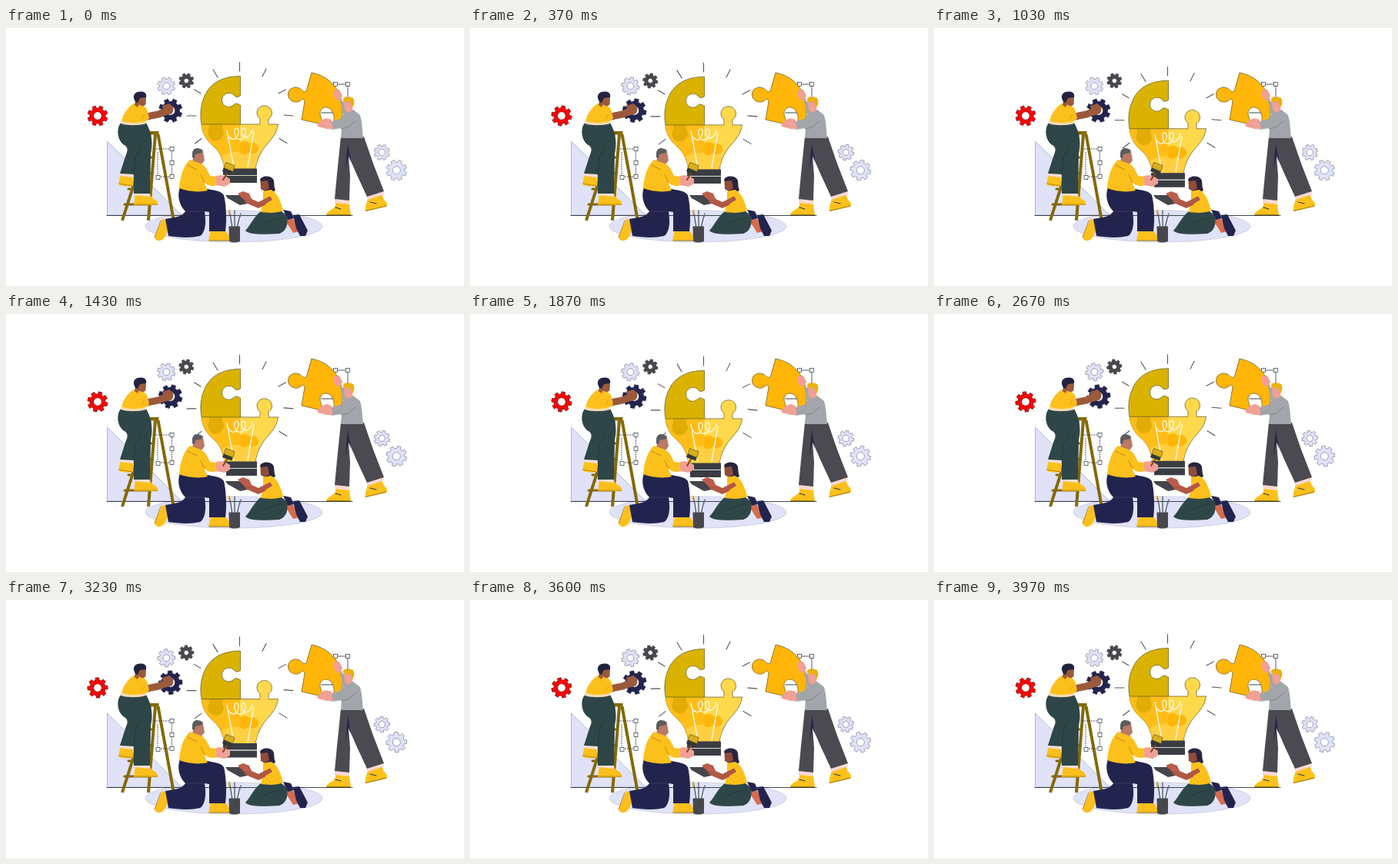
Animation of 595x335 px, one loop 4010 ms. Source, as an HTML page:

```html
<!DOCTYPE html>
<html lang="en">
<head>
<meta charset="utf-8">
<title>Building an idea</title>
<style>
  html, body { margin: 0; width: 100%; height: 100%; overflow: hidden; background: #fff; }
  svg { display: block; width: 595px; height: 335px; }
</style>
</head>
<body>
<svg id="stage" viewBox="0 0 595 335" xmlns="http://www.w3.org/2000/svg"></svg>
<script>
const LOOP = 4010;
const DROP = 11;
const YELLOW = '#fcc01c', GOLD = '#d9b300', ORANGE = '#ffb608', LEMON = '#ffd84c';
const NAVY = '#23244e', TEAL = '#2e4647', COAL = '#46484c', INK = '#263238';
const LILAC = '#e0e2f8', BROWN = '#9b5a3c', TAN = '#b87a62', PINK = '#f0a095', WOOD = '#84690a';

const attrs = o => Object.entries(o).map(([k, v]) => ` ${k}="${v}"`).join('');
const shape = (d, fill, extra = {}) => `<path d="${d}" fill="${fill}"${attrs(extra)}/>`;
const line = (d, stroke, width = 1, extra = {}) =>
  shape(d, 'none', { stroke, 'stroke-width': width, 'stroke-linecap': 'round', 'stroke-linejoin': 'round', ...extra });
const disc = (x, y, r, fill) => `<circle cx="${x}" cy="${y}" r="${r}" fill="${fill}"/>`;
const group = (id, body) => `<g id="${id}">${body}</g>`;
const thin = { stroke: '#5f5523', 'stroke-width': 0.7 };

const handles = points => points.map(([x, y]) =>
  `<rect x="${x - 2.5}" y="${y - 2.5}" width="5" height="5" fill="#fff" stroke="${INK}" stroke-width=".7"/>`).join('');

function gearPath(radius, hole) {
  const teeth = 8, step = 2 * Math.PI / teeth;
  const profile = [[-0.31, 0.77], [-0.22, 1], [0.22, 1], [0.31, 0.77]];
  const points = [];
  for (let i = 0; i < teeth; i++)
    for (const [offset, scale] of profile) {
      const angle = (i + 0.5 + offset) * step;
      points.push(`${(Math.cos(angle) * radius * scale).toFixed(2)} ${(Math.sin(angle) * radius * scale).toFixed(2)}`);
    }
  return `M${points.join('L')}ZM${hole} 0A${hole} ${hole} 0 1 0 ${-hole} 0A${hole} ${hole} 0 1 0 ${hole} 0Z`;
}

const gears = [
  { x: 119, y: 114, r: 13.2, hole: 5.3, fill: '#fb0507', edge: '#6d1010' },
  { x: 208.3, y: 75.3, r: 11.6, hole: 4.4, fill: LILAC, edge: '#85879a' },
  { x: 234.3, y: 68.5, r: 9.7, hole: 3.1, fill: COAL, edge: COAL },
  { x: 213.7, y: 107.2, r: 15.4, hole: 6, fill: NAVY, edge: NAVY },
  { x: 488.3, y: 161.5, r: 10.4, hole: 4.1, fill: LILAC, edge: '#85879a' },
  { x: 507.3, y: 184.7, r: 13.4, hole: 5, fill: LILAC, edge: '#85879a' }
];
const gearMarkup = gears.map((g, i) => group('gear' + i,
  shape(gearPath(g.r, g.hole), g.fill, { 'fill-rule': 'evenodd', stroke: g.edge, 'stroke-width': 0.7 }))).join('');

const ground =
  `<ellipse cx="296" cy="257.5" rx="115" ry="20.5" fill="${LILAC}" stroke="#b9bccc" stroke-width=".6"/>` +
  shape('M131.5 147V243H228Z', LILAC, { stroke: '#9a9db0', 'stroke-width': 0.7 }) +
  line('M131 243.5H450', INK, 0.9);

const ladder =
  line('M197.5 138L217.5 248', WOOD, 4, { 'stroke-linecap': 'butt' }) +
  line('M187 138L151 250M194 138L185 250', WOOD, 4, { 'stroke-linecap': 'butt' }) +
  line('M154 229H187M159 209H188M168 189H190M174 168H191', WOOD, 3) +
  shape('M180 134H198.5V138.5H180Z', WOOD);

const frames =
  line('M192 157H215.5V193H197V160', INK, 0.8, { 'stroke-dasharray': '2 1', 'stroke-linecap': 'butt' }) +
  handles([[215.5, 157], [215.5, 175], [215.5, 193], [197.5, 194]]) +
  line('M428 73H444V90', INK, 0.8, { 'stroke-linecap': 'butt' }) +
  handles([[428, 73], [444, 73]]);

const glass = 'M254 125C255 139 262 147 270 154C279 162 282 172 284 183H324C326 171 331 160 339 151C348 141 352 135 353.5 125Z';
const bulb =
  line('M303.5 44.5V56M338 53L333 63M269 54L275 64M244.5 80L253 85M235 114H247' +
       'M361 113L373 114M363.5 80L354 85M245.5 150L254 143.5M355 143.5L365 149.5', '#54565a', 1.1) +
  shape(glass, LEMON, thin) +
  `<clipPath id="glass"><path d="${glass}"/></clipPath><g clip-path="url(#glass)">` +
  shape('M250 123H304V160L300 184H250Z', '#ffbd18') +
  shape('M281 165Q304 156 328 166L323 184H284Z', '#ffcf42') +
  shape('M304 149C309 145 315 147 316 150C323 146 329 152 328 158C326 164 319 165 315 161C312 166 307 164 304 162Z', ORANGE) +
  shape('M264 124V130C262 133 262 138 264 142C268 148 277 148 281 142C284 138 283 133 281 130V124Z', '#e0ad08') +
  '</g>' +
  shape('M330 126V118C324 113 325 104 332 101.5C339 99 346 104 345.5 111C345 115 343 117 341 118V126Z', LEMON, thin) +
  shape('M330 124H341V130H330Z', LEMON) +
  shape('M304.5 62.5V88C301 90 298 90 297 88C292 82 283 84 281 91C279 98 285 104 292 102C295 101 297 98 299 98C301 98 303 100 304.5 100V125H254C251 109 254 93 262 81C271 68 286 62.5 304.5 62.5Z', GOLD, thin) +
  line('M296 181L287 133C288 146 300 149 302 136C303 128 296 128 297 136C298 147 309 148 311 136C312 128 305 128 306 136C308 146 317 143 320 132M322 135L314 181', '#fffbe6', 1.4) +
  shape('M282 182.5H326V191H282Z', '#3a3d42') +
  shape('M286 192H326V201H286Z', '#3a3d42') +
  line('M288 191.5H326', '#c8c9cb', 0.8);

const climber =
  shape('M149 189L166 191L165 205C157 206 150 206 146 203Z', YELLOW) +
  shape('M149 188H166L165 194L147 192Z', '#f7dfd7') +
  shape('M168 216H187C188 221 194 222 197 226V230H166Z', YELLOW) +
  shape('M167 213H187V219L167 217Z', '#f7dfd7') +
  line('M147 202L164 205M167 229H197', '#a17508', 0.8) +
  shape('M150 122C143 129 144 144 152 151C160 155 158 160 155 167L148 189L166 190V215H187L188 164C191 150 190 137 182 123Z', TEAL) +
  line('M166 190L168 168L175 157', '#1e3031', 0.7) +
  line('M178 116L198 112L213 106', BROWN, 9) +
  shape('M203 101L212 98L217 102L216 111L206 114Z', BROWN) +
  shape('M166 98C158 103 152 112 150 121C157 125 172 125 181 122L186 117L183 105C178 100 173 98 166 98Z', YELLOW) +
  shape('M150 120C157 124 172 124 181 121L182 124C173 127 157 127 149 124Z', '#f3dcb4') +
  line('M180 112L176 118', '#b98a12', 0.7) +
  shape('M169 89H182L181.5 99C179 103 174 101 173 99L171 103L167 100Z', BROWN) +
  shape('M166 91C165 85 170 82 176 82.5C181 83 183 86 182 90L174 91L171 97L168 96Z', '#22233f');

const puzzle =
  shape('M397 58C418 62 434 77 437 101C438 110 436 120 433 128L424 126C427 121 427 113 423 107C417 100 409 103 408 110C408 115 411 118 410 125L384 119L388 95C386 91 385 92 383 94C377 99 367 95 366.5 87C366 79 374 75 381 78C385 80 386 84 390 82Z', ORANGE, thin) +
  line('M410 110H424', INK, 1, { 'stroke-dasharray': '2 1' });

const carrier =
  shape('M428 226L446 228L448 243H416C417 237 425 236 428 231Z', YELLOW) +
  shape('M470 221L488 215L491 223C495 226 496 229 494 232L467 238C466 231 469 227 470 221Z', YELLOW) +
  line('M417 242.5H447M467 237.5L494 231', '#a17508', 1) +
  line('M428 233L435 235M473 226L481 228', INK, 1) +
  shape('M427 221L446 223V229L427 227ZM468 218L490 210L491 216L470 223Z', '#f8d9d1') +
  shape('M435 141L430 190L427 222L446 224L447 192L445 166L456 191L469 219L491 212L477 176L465 141Z', '#4a4a50') +
  shape('M444 150L448 174L445 166L441 184Z', NAVY) +
  shape('M434 94L439 96L446 109L438 112Z', '#a2a5a9') +
  shape('M425 81L433 80L437 88L434 95L427 92Z', PINK) +
  shape('M441 108L451 106L460 113C463 123 463 134 464 143H435L436 130L423 132L421 122L434 118Z', '#a2a5a9') +
  line('M454 121L444 129L435 131', '#777a80', 0.8) +
  shape('M423 119L425 131L415 131C411 128 406 130 404 126L409 120L416 117Z', PINK) +
  shape('M439 94L451 95L450 107L444 110L440 106Z', PINK) +
  shape('M438 95C437 89 444 88 451 91C453 95 453 99 450 103L448 97Z', '#edaf0d');

const kneeler =
  shape('M203 248L215 251L207 270C205 275 199 278 195 275C191 272 195 266 197 262Z', YELLOW) +
  line('M201 250L193 272', '#a17508', 0.8) +
  shape('M266 262L285 263L290 270V276H263Z', YELLOW) +
  line('M264 276H290', '#9b7510', 1) +
  shape('M226 207C222 218 225 230 233 238C229 245 220 246 207 248L211 270C224 272 240 273 252 270C260 265 260 250 258 238L264 239V264H285C287 248 286 229 283 217C279 211 270 211 262 209Z', NAVY) +
  line('M233 238L256 238', '#44456b', 0.7) +
  shape('M244 160L256 161L258 172L253 178L242 175Z', TAN) +
  shape('M242 162C243 155 250 154 256 159L255 162L246 164L245 169L242 168Z', '#5b5d5f') +
  shape('M239 171L253 176C259 179 262 185 265 192L274 193L274 204C266 207 260 203 257 200L262 211C250 214 235 212 225 208C226 194 230 179 239 171Z', YELLOW) +
  line('M236 178L248 184M253 190L258 201', '#9b7515', 0.7) +
  shape('M273 192C278 191 282 191 286 193L291 196V202L284 206L273 204Z', PINK) +
  line('M282 197L287 189', '#7f481f', 2) +
  shape('M283 181L295 186L293 190.5L281 186Z', '#34373a') +
  shape('M285.5 174.5L297 178.5L295 186.5L283 181.5Z', '#d9ae1c', thin);

const helper =
  shape('M361 247L373 248L382 264L373 266Z', '#d66c50') +
  shape('M360 236L370 238L374 247L366 249ZM373 243L381 242L392 263L389 270L382 270L377 260Z', NAVY) +
  shape('M331 238C322 245 317 257 311 263C316 269 337 268 355 267C364 264 367 255 365 244L358 238Z', TEAL) +
  line('M333 255C342 248 350 250 359 246', '#1e3031', 0.7) +
  shape('M330 197C332 192 341 191 346 195C350 199 347 205 350 210C348 215 339 214 335 211Z', '#2a243f') +
  shape('M330.5 199L340 198L342 208L336 212L331 209Z', '#8f4c38') +
  shape('M334 212L344 210C352 213 357 224 360 237C351 241 339 240 331 239L334 225Z', YELLOW) +
  shape('M285 217H310L315 221L314 228L304 230L288 221Z', '#45464b') +
  line('M344 222L328 230L314 224', '#b05845', 7.5) +
  shape('M301 215L308 212L316 215L320 224L309 223Z', '#bc5c4b') +
  line('M346 217L350 224L340 230', YELLOW, 6);

const cup =
  line('M294 260L291 240M297 260V237M300 260L304 243', INK, 1) +
  line('M290.5 242L290 237', '#d7a80c', 2.2) +
  line('M304 245L305 241', '#777', 1.6) +
  shape('M289.5 257.5H304V277Q296.5 280 290 277Z', COAL);

document.getElementById('stage').innerHTML =
  ground + ladder + frames + gearMarkup + climber + group('bulb', bulb) +
  puzzle + carrier + kneeler + helper + cup;

const bulbNode = document.getElementById('bulb');
const gearNodes = gears.map((_, i) => document.getElementById('gear' + i));

function render(time) {
  const phase = (time % LOOP) / LOOP;
  const drop = DROP * (1 - Math.cos(2 * Math.PI * phase)) / 2;
  bulbNode.setAttribute('transform', `translate(0 ${drop.toFixed(3)})`);
  gears.forEach((g, i) =>
    gearNodes[i].setAttribute('transform', `translate(${g.x} ${g.y}) rotate(${(360 * phase).toFixed(2)})`));
}

const start = performance.now();
function tick() {
  render(performance.now() - start);
  requestAnimationFrame(tick);
}
tick();
</script>
</body>
</html>
```
